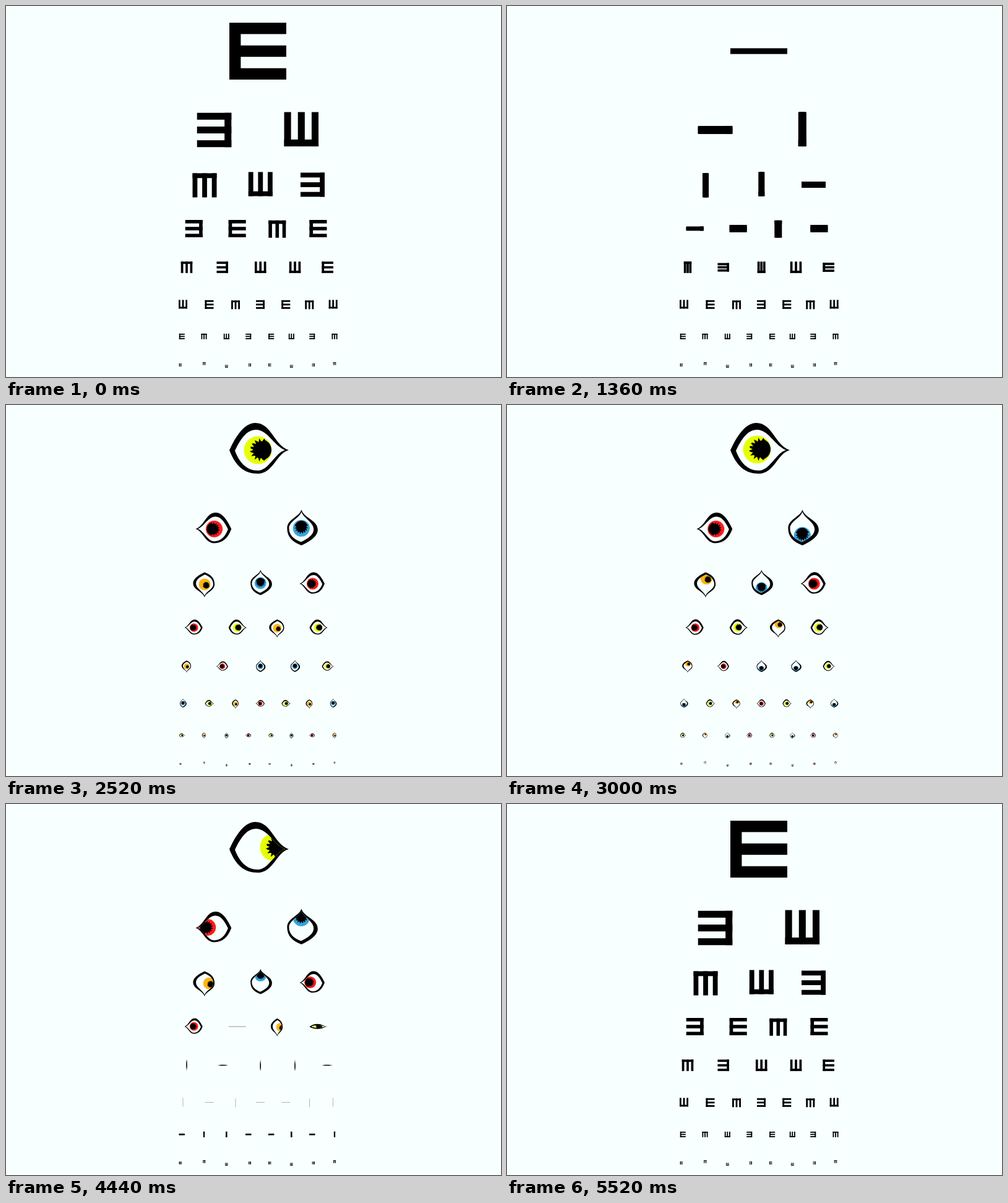
An HTML page with a canvas that plays this animation: 800x600 px, repeating every 5760 ms.

```html
<!DOCTYPE html>
<html lang="en">
<head>
<meta charset="utf-8">
<title>Eye chart</title>
<style>
html, body { margin: 0; width: 100%; height: 100%; overflow: hidden; background: #f8ffff; }
canvas { display: block; }
</style>
</head>
<body>
<canvas id="stage" width="800" height="600"></canvas>
<script>
const ctx = document.getElementById('stage').getContext('2d');
const LOOP = 5760, STEP = 40, UNIT = 92, PAPER = '#f8ffff';
const FOLD = 445, OPEN = 360, SHUT = 200, GROW = 240;
const LASH = 4.6; // half height of the bar that turns into lashes

// Each kind: where its open side points, iris colour, pupil [x, y, scale], gaze [x, y] over time
const KINDS = {
  E: { axes: [1, 0, 0, 1], color: '#e6ff00', pupil: [5, -0.5, 1],
    gaze: [[0, 0], [-3, -1], [-4, -15], [-1, -3], [26, -3]] },
  B: { axes: [-1, 0, 0, 1], color: '#ff1c1c', pupil: [3, 0, 1],
    gaze: [[0, 0], [-2, 0], [-3, -21], [0, -1], [27, -2]] },
  W: { axes: [0, -1, -1, 0], color: '#36a4dc', pupil: [3, 0, 1],
    gaze: [[0, 0], [-19, 0], [21, 0], [25, 0], [25, 0]] },
  M: { axes: [0, 1, 1, 0], color: '#ffb414', pupil: [3, 6, 0.75],
    gaze: [[0, 0], [-22, 3], [-14, 13], [0, 17], [0, 17]] }
};
// Start, end and delay per row of each gaze move
const GAZE_MOVES = [[2740, 3000, 0], [3300, 3720, 0], [3960, 4200, 0], [4200, 4440, 80]];

// fold: letter starts to collapse; shut: eye starts to close; drop: offset of M (down) and W (up)
const ROWS = [
  { y: 73, size: 92, kinds: 'E', xs: [407], drop: 0, fold: [960], shut: [5060] },
  { y: 200.5, size: 55.5, kinds: 'BW', xs: [336.5, 477.3], drop: 1.2, fold: [1020], shut: [4870] },
  { y: 289, size: 39, kinds: 'MWB', xs: [321, 411.3, 495.5], drop: 1, fold: [1030], shut: [4760] },
  { y: 360, size: 28, kinds: 'BEME', xs: [303.7, 373.7, 438.3, 504.5], drop: 0.8,
    fold: [1026, 1106, 1106, 1106], shut: [4450, 4240, 4395, 4305] },
  { y: 422.6, size: 18.5, kinds: 'MBWWE', xs: [292, 349.7, 411.2, 467, 519.7], drop: 0,
    fold: [1213, 1250, 1226, 1360, 1271], shut: [4260] },
  { y: 482.8, size: 14, kinds: 'WEMBEMW', xs: [286, 328.5, 371, 411, 452.3, 490.3, 528.7], drop: 0.5,
    fold: [1440], shut: [4235] },
  { y: 534.4, size: 9, kinds: 'EMWBEWBM', xs: [284.3, 320, 356.3, 391.7, 428.7, 461.3, 494.7, 531], drop: 0,
    fold: [1560], shut: [4180] },
  { y: 580.5, size: 4.5, kinds: 'EMWBEWBM', xs: [282, 320.3, 356.3, 393.7, 426.3, 461.3, 496.7, 531], drop: -2,
    fold: [1685], shut: [4024] }
];

const outline = new Path2D('M-46 0C-36-22-22-44-4-44C22-44 26-8 50 0C30 5 25 38 0 38C-22 38-36 26-46 0Z');
const white = new Path2D('M-37 1C-28-18-18-33-3-33C16-33 26-7 44 0C28 4 18 33 0 33C-18 33-30 20-37 1Z');
const disc = new Path2D();
disc.arc(0, 0, 22.5, 0, Math.PI * 2);
const pupil = new Path2D();
for (let i = 0; i < 44; i++) {
  const angle = i * Math.PI / 22;
  const radius = Math.cos(angle) < 0.35 ? 15.5 + 3.5 * Math.sin(i * 2.2) : 17;
  pupil.lineTo(radius * Math.cos(angle), radius * Math.sin(angle));
}

const ramp = (t, from, to) => Math.min(1, Math.max(0, (t - from) / (to - from)));
const smooth = p => p * p * (3 - 2 * p);
const fill = (color, path) => { ctx.fillStyle = color; ctx.fill(path); };

function drawLetter(height) {
  const h = UNIT * height, arm = Math.min(UNIT / 5, h);
  ctx.fillStyle = '#000';
  if (h <= arm) return ctx.fillRect(-46, -h / 2, UNIT, h);
  ctx.fillRect(-46, -h / 2, UNIT / 5, h);
  for (const y of [-h / 2, -arm / 2, h / 2 - arm]) ctx.fillRect(-46, y, UNIT, arm);
}

// A thin bar hollowed at its ends into two crossing lashes
function drawLashes(edge, hollow) {
  ctx.fillStyle = '#000';
  for (const side of [-1, 1]) {
    const outer = side * edge, inner = outer * hollow * 0.85;
    ctx.beginPath();
    ctx.moveTo(-46, outer);
    ctx.quadraticCurveTo(0, outer * (1 - hollow), 46, outer);
    ctx.lineTo(46, inner);
    ctx.quadraticCurveTo(0, -inner, -46, inner);
    ctx.fill();
  }
}

function gazeAt(poses, t, rowIndex) {
  let [x, y] = poses[0];
  GAZE_MOVES.forEach(([from, to, delay], i) => {
    const p = ramp(t - delay * rowIndex, from, to);
    x += (poses[i + 1][0] - poses[i][0]) * p;
    y += (poses[i + 1][1] - poses[i][1]) * p;
  });
  return [x, y];
}

// The lids keep their weight, so the white narrows faster than the outline
function drawEye(kind, openness, gaze) {
  const lids = Math.max(openness, 0.015), gap = 1.2 * openness - 0.2;
  ctx.scale(1, lids);
  fill('#000', outline);
  if (gap <= 0) return;
  ctx.scale(1, gap / lids);
  fill(PAPER, white);
  ctx.clip(white);
  ctx.scale(1, 1 / gap);
  ctx.translate(...gaze);
  fill(kind.color, disc);
  const [x, y, scale] = kind.pupil;
  ctx.translate(x, y);
  ctx.scale(scale, scale);
  fill('#000', pupil);
}

function drawSymbol(row, rowIndex, i, t) {
  const name = row.kinds[i], kind = KINDS[name];
  const fold = row.fold[i] ?? row.fold[0], shut = row.shut[i] ?? row.shut[0];
  const opening = 2120 + 25 * rowIndex;
  const open = smooth(ramp(t, opening, opening + OPEN));
  const closed = ramp(t, shut, shut + SHUT);
  const drop = name === 'M' ? row.drop : name === 'W' ? -row.drop : 0;

  ctx.save();
  ctx.translate(row.xs[i], row.y + drop);
  ctx.transform(...kind.axes, 0, 0);
  ctx.scale(row.size / UNIT, row.size / UNIT);
  if (closed === 1) {
    drawLetter(Math.max(0.015, ramp(t, shut + SHUT, shut + SHUT + GROW)));
  } else if (open > 0) {
    if (open < 0.2 && rowIndex < 5) drawLashes(LASH * (1 - open / 0.2), 1);
    drawEye(kind, open * (1 - closed), gazeAt(kind.gaze, t, rowIndex));
  } else {
    const height = 1 - ramp(t, fold, fold + FOLD);
    if (height > 2 * LASH / UNIT || rowIndex > 4) drawLetter(height);
    else drawLashes(LASH, ramp(t, fold + FOLD, 2100));
  }
  ctx.restore();
}

function frame(now) {
  const t = Math.floor(now % LOOP / STEP) * STEP;
  ctx.fillStyle = PAPER;
  ctx.fillRect(0, 0, 800, 600);
  ROWS.forEach((row, r) => row.xs.forEach((_, i) => drawSymbol(row, r, i, t)));
  requestAnimationFrame(() => frame(performance.now() - start));
}
const start = performance.now();
frame(0);
</script>
</body>
</html>
```
